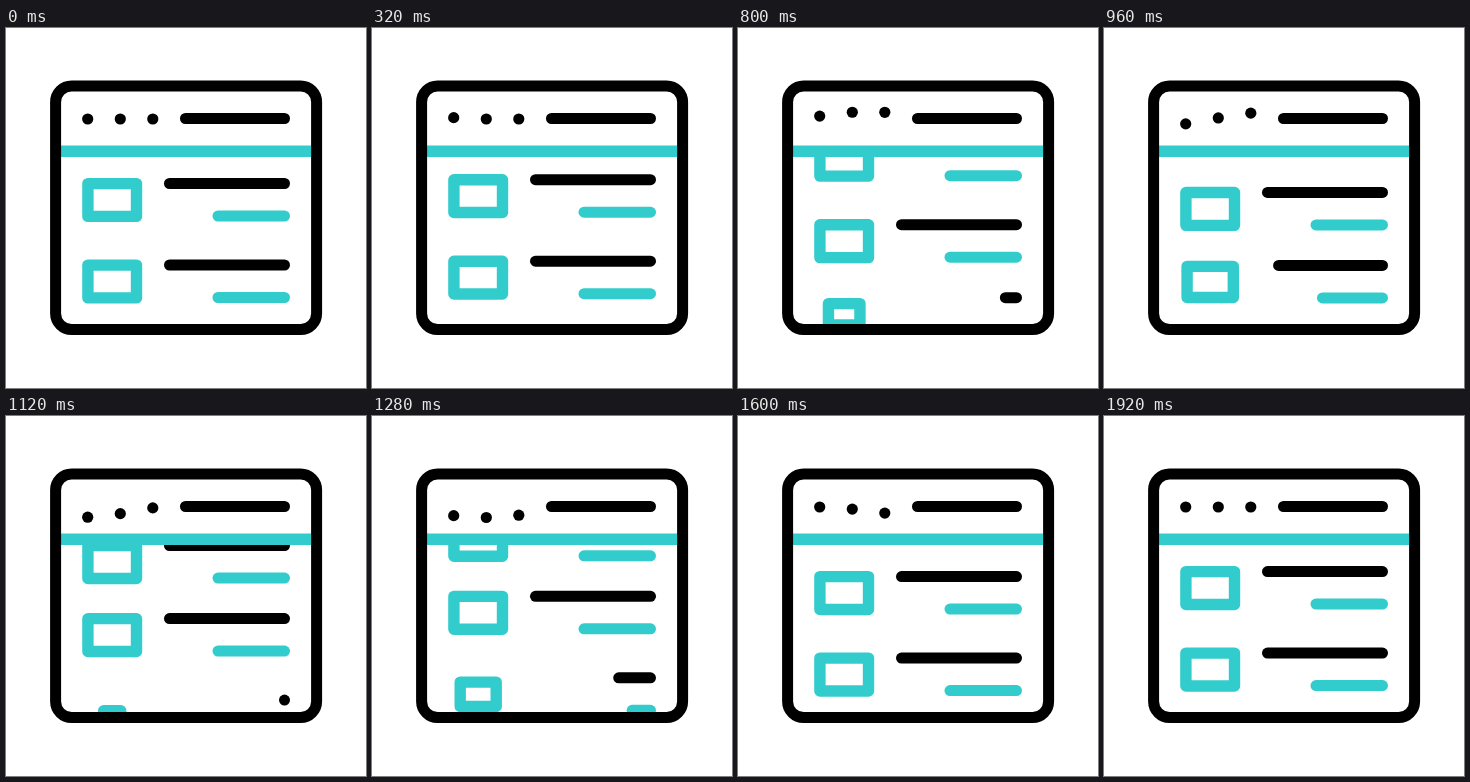
Write an HTML page that moves like this. It is 360 px wide and 360 px high and loops after 2 s.

```html
<!DOCTYPE html>
<html lang="en">
<head>
<meta charset="utf-8">
<title>Scrolling page</title>
<style>
  html, body { margin: 0; width: 100%; height: 100%; overflow: hidden; background: #fff; }
  svg { display: block; width: 100%; height: 100%; fill: none; stroke-width: 11; stroke-linecap: round; stroke-linejoin: round; }
  .ink { stroke: #000; }
  .teal { stroke: #3cc; }
</style>
</head>
<body>
<svg viewBox="0 0 360 360">
  <clipPath id="page"><rect x="50" y="123" width="260" height="178"/></clipPath>
  <g id="rows" clip-path="url(#page)"></g>
  <path class="teal" d="M55 123.2H305" stroke-width="11.5" stroke-linecap="butt"/>
  <path class="ink" d="M179.5 90.5H278.5"/>
  <g id="dots" fill="#000"></g>
  <rect class="ink" x="49.6" y="58" width="261" height="243.5" rx="16"/>
</svg>
<script>
const LOOP = 2000, STEP = 40, SCROLL_TIME = 1960, SCROLL = 154.5;
const RIGHT = 278.5;

function add(parent, name, attrs) {
  const el = document.createElementNS("http://www.w3.org/2000/svg", name);
  set(el, attrs);
  return document.getElementById(parent).appendChild(el);
}

function set(el, attrs) {
  for (const key in attrs) el.setAttribute(key, attrs[key]);
}

const smooth = p => p * p * (3 - 2 * p);

// Eased progress from time a to time b.
const ramp = (t, a, b) => smooth(Math.min(1, Math.max(0, (t - a) / (b - a))));

// Symmetric cubic Bezier easing with handles at 2/3 and 1/3.
function scrollEase(p) {
  let lo = 0, hi = 1;
  for (let i = 0; i < 30; i++) {
    const s = (lo + hi) / 2, r = 1 - s;
    const x = 2 * s * r * r + s * s * r + s * s * s;
    if (x < p) lo = s; else hi = s;
  }
  return smooth(lo);
}

// start is when a row begins to grow; the first two are already complete.
const rows = [
  { y: 155.5, start: -LOOP },
  { y: 237, start: -LOOP },
  { y: 310, start: 440 },
  { y: 391.5, start: 880 }
].map(row => ({
  ...row,
  box: add("rows", "rect", { class: "teal", "stroke-width": 11.4 }),
  title: add("rows", "line", { class: "ink", x2: RIGHT }),
  note: add("rows", "line", { class: "teal", x2: RIGHT })
}));

const dots = [81.7, 114.3, 146.8].map(cx => add("dots", "circle", { cx, r: 5.6 }));

function drawRow(row, t, scroll) {
  const y = row.y - scroll;
  const size = ramp(t, row.start, row.start + 600);
  const drawn = ramp(t, row.start + 310, row.start + 570);
  const width = 48.6 * size, height = 32.8 * size;
  set(row.box, { x: 106.2 - width / 2, y: y + 16.5 - height / 2, width, height });
  set(row.title, { x1: RIGHT - 115 * drawn, y1: y, y2: y });
  set(row.note, { x1: RIGHT - 66.5 * drawn, y1: y + 32.5, y2: y + 32.5 });
}

const bounce = t =>
  -7.2 * ramp(t, 200, 630) + 17.7 * ramp(t, 630, 1160) - 10.5 * ramp(t, 1160, 1610);

function render(t) {
  const scroll = SCROLL * scrollEase(Math.min(1, t / SCROLL_TIME));
  rows.forEach(row => drawRow(row, t, scroll));
  dots.forEach((dot, i) => set(dot, { cy: 91 + bounce(t - 120 * i) }));
}

const origin = performance.now();

function tick() {
  const t = (performance.now() - origin) % LOOP;
  render(Math.floor(t / STEP) * STEP);
  requestAnimationFrame(tick);
}
tick();
</script>
</body>
</html>
```
